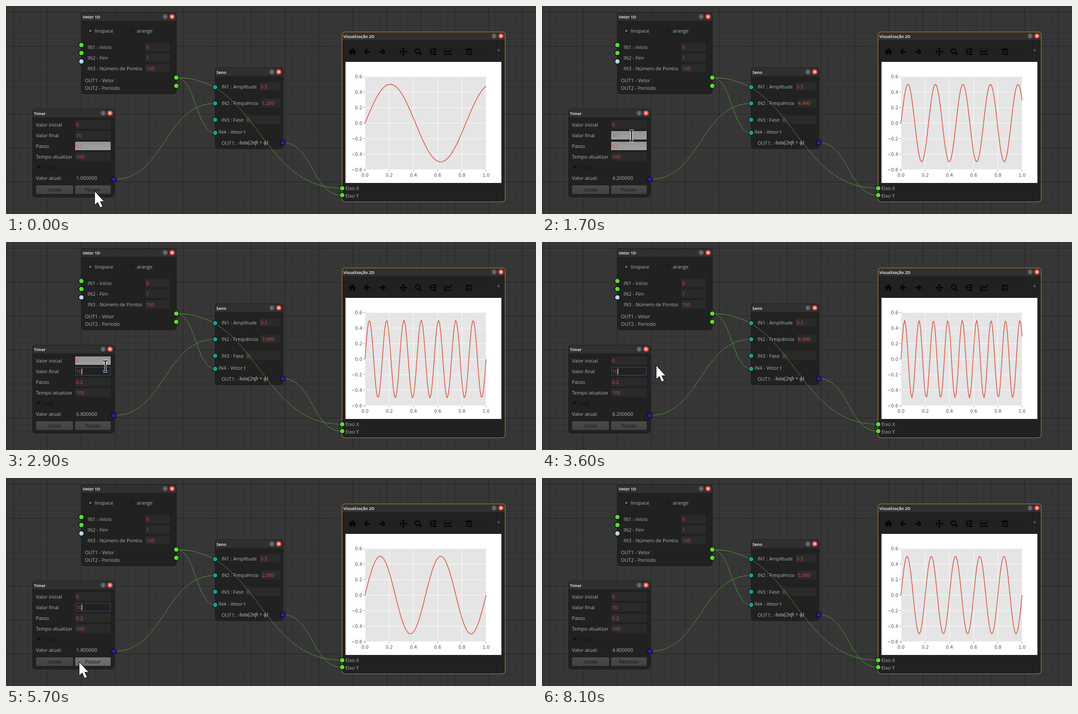
These frames come from a looping animation (1195x469 px, 8.5 s). An HTML page with a canvas:

```html
<!DOCTYPE html>
<html lang="pt">
<head>
<meta charset="utf-8">
<title>Editor de nós</title>
<style>
html, body { margin: 0; width: 100%; height: 100%; overflow: hidden; background: #363636; }
canvas { display: block; }
</style>
</head>
<body>
<canvas id="stage" width="1195" height="469"></canvas>
<script>
const c = document.getElementById('stage').getContext('2d');
const SANS = '"Open Sans", "Noto Sans", sans-serif';
const PLOT = '"DejaVu Sans", sans-serif';
const MATH = '"Liberation Serif", serif';
const GREY = '#b2b2b2', RED = '#f0453f', INK = '#040404';
const GREEN = '#5bdc33', TEAL = '#17a094', PURPLE = '#3a14a4', BLUE = '#b5d9ec';
const LOOP = 8500, TICK = 100;
const FOCUS_ON = 19, FOCUS_OFF = 77, PAUSE = 71, GONE = 81;

// Key points: tick, value(s)
const steps = [[0, 0], [17, 16], [29, 29], [57, 55], [66, 64], [PAUSE, 70]];
const path = [
  [0, 200, 418], [9, 190, 322], [13, 125, 304], [17, 202, 293], [29, 224, 280], [43, 291, 277],
  [57, 165, 415], [60, 140, 415], [66, 174, 416], [76, 174, 416], [80, 89, 5]
];

const linear = t => t;
const smooth = t => t * t * (3 - 2 * t);

function along(keys, k, ease) {
  const i = keys.findIndex(key => key[0] > k);
  if (i < 0) return keys.at(-1).slice(1);
  const [a, ...from] = keys[i - 1], [b, ...to] = keys[i];
  const f = ease((k - a) / (b - a));
  return from.map((v, j) => v + (to[j] - v) * f);
}

function text(s, x, y, color = GREY, font = '11px ' + SANS, align = 'left') {
  c.font = font;
  c.textAlign = align;
  c.fillStyle = color;
  c.fillText(s, x, y);
}

function rect(x, y, w, h, color) {
  c.fillStyle = color;
  c.fillRect(x, y, w, h);
}

function dot(x, y, r, fill, stroke, width = 1.4) {
  c.beginPath();
  c.arc(x, y, r, 0, 7);
  if (fill) { c.fillStyle = fill; c.fill(); }
  if (stroke) { c.strokeStyle = stroke; c.lineWidth = width; c.stroke(); }
}

function line(points, color, width, close) {
  c.beginPath();
  points.forEach(([x, y]) => c.lineTo(x, y));
  if (close) c.closePath();
  c.strokeStyle = color;
  c.lineWidth = width;
  c.stroke();
}

function shape(points, color) {
  c.beginPath();
  points.forEach(([x, y]) => c.lineTo(x, y));
  c.fillStyle = color;
  c.fill();
}

function box(x, y, w, h, r, fill, stroke, width = 1) {
  c.beginPath();
  c.roundRect(x, y, w, h, r);
  if (fill) { c.fillStyle = fill; c.fill(); }
  if (stroke) { c.strokeStyle = stroke; c.lineWidth = width; c.stroke(); }
}

function shade(y, h, top, bottom) {
  const g = c.createLinearGradient(0, y, 0, y + h);
  g.addColorStop(0, top);
  g.addColorStop(1, bottom);
  return g;
}

function grid() {
  rect(0, 0, 1195, 469, '#373737');
  for (let i = -1; i < 80; i++) {
    const bold = i % 5 === 0, d = i * 15.3;
    const color = bold ? '#292929' : '#303030', width = bold ? 1.5 : 0.8;
    line([[17 + d, 0], [17 + d, 469]], color, width);
    line([[0, 14.3 + d], [1195, 14.3 + d]], color, width);
  }
}

function node(title, x, y, w, h, border = '#191919') {
  box(x, y, w, h, 7, '#212121');
  box(x, y, w, 18.5, [7, 7, 0, 0], '#303030');
  box(x, y, w, h, 7, null, border, 1.1);
  text(title, x + 3, y + 13, '#fff', '600 9.4px ' + SANS);
  const cy = y + 9, bx = x + w - 9.5;
  dot(bx - 15.5, cy, 5.8, '#5a5a61');
  text('i', bx - 15.5, cy + 3.2, '#c4c4c4', '9px ' + SANS, 'center');
  dot(bx, cy, 5.8, '#fa524d');
  for (const d of [-2.2, 2.2]) line([[bx - d, cy - 2.2], [bx + d, cy + 2.2]], '#fff', 1.3);
}

function field(s, x, y, w, state) {
  rect(x, y - 10, w, 19, state === 'hover' ? shade(y - 10, 19, '#959595', '#a0a0a0') : '#2a2a2a');
  if (state === 'focus') {
    box(x + 0.5, y - 9.5, w - 1, 18, 0, '#202124', '#2c5584');
    rect(x + 14.5, y - 7, 1.2, 14, '#eee');
  }
  text(s, x + 2, y + 4, RED);
}

function button(s, x, w, hover) {
  const fill = hover ? shade(405, 18, '#757575', '#666') : shade(405, 18, '#4b4b4b', '#414141');
  box(x + 0.5, 405, w - 1, 18, 1.5, fill, hover ? '#777' : '#555', 0.8);
  text(s, x + w / 2, 418, '#171717', '11px ' + SANS, 'center');
}

function edge(x, y, u, v) {
  const mid = (x + u) / 2;
  c.beginPath();
  c.moveTo(x, y);
  c.bezierCurveTo(mid, y, mid, v, u, v);
  c.strokeStyle = '#55b035';
  c.lineWidth = 0.9;
  c.stroke();
}

function sockets(x, color, ...ys) {
  ys.forEach(y => dot(x, y, 5.8, color, '#080808'));
}

function toolbar() {
  const y = 103;
  shape([[772, 104], [781, 95.5], [790, 104]], INK);
  rect(775, y, 4.5, 6.5, INK);
  rect(782.5, y, 4.5, 6.5, INK);
  for (const [x, d] of [[815, -1], [848, 1]]) {
    line([[x - 7 * d, y], [x + 5 * d, y]], INK, 3);
    line([[x, y - 6], [x + 6 * d, y], [x, y + 6]], INK, 3);
  }
  for (let i = 0; i < 4; i++) {
    c.save();
    c.translate(896, y);
    c.rotate(i * Math.PI / 2);
    rect(0, -1, 7, 2, INK);
    shape([[9, 0], [5, -3.5], [5, 3.5]], INK);
    c.restore();
  }
  dot(928, 101.5, 5, null, INK, 2.4);
  line([[931.5, 105], [936.5, 110]], INK, 3.2);
  for (const i of [-1, 0, 1]) {
    rect(955, y + i * 5.5 - 1, 16, 2, INK);
    rect(i ? 965 : 957, y + i * 5.5 - 2.5, 3.5, 5, INK);
  }
  line([[989, 96], [989, 109], [1006, 109]], INK, 1.8);
  line([[991, 106], [995, 101], [999, 104], [1005, 97]], INK, 2.2);
  box(1038, 97, 12, 12, 1, null, INK, 2);
  rect(1040, 97, 6, 4, INK);
  rect(1040, 104, 8, 1.5, INK);
  text('»', 1111, 103, '#8d8d8d', '12px ' + SANS, 'center');
}

function plot(freq) {
  const x0 = 809.5, y0 = 159, w = 273, h = 210;
  rect(765.5, 126, 351.5, 273, '#fff');
  rect(x0, y0, w, h, '#e5e5e5');
  for (let i = 0; i < 6; i++) {
    const x = x0 + i * w / 5;
    line([[x, y0], [x, y0 + h]], '#fff', 0.9);
    line([[x, y0 + h], [x, y0 + h + 3.5]], '#555', 0.8);
    text((i / 5).toFixed(1), x, 385, '#555', '10px ' + PLOT, 'center');
  }
  for (let i = -3; i <= 3; i++) {
    const y = y0 + h / 2 - i * h / 6;
    line([[x0, y], [x0 + w, y]], '#fff', 0.9);
    line([[x0 - 3.5, y], [x0, y]], '#555', 0.8);
    text((i / 5).toFixed(1).replace('-', '−'), 803, y + 4, '#555', '10px ' + PLOT, 'right');
  }
  const wave = Array.from({ length: 100 }, (_, i) => {
    const t = i / 99;
    return [x0 + w * t, y0 + h / 2 - 87.5 * Math.sin(2 * Math.PI * freq * t)];
  });
  c.lineJoin = 'round';
  line(wave, '#dd503b', 1.6);
  c.lineJoin = 'miter';
}

function pointer(x, y, beam) {
  c.save();
  c.translate(x, y);
  c.lineJoin = 'round';
  if (beam) {
    for (const [color, width] of [['#fff', 4.4], ['#000', 2.2]]) {
      for (const d of [-1, 1]) {
        line([[-5, 12 * d], [-1.5, 12 * d], [0, 10.5 * d], [1.5, 12 * d], [5, 12 * d]], color, width);
      }
      line([[0, -11], [0, 11]], color, width);
    }
  } else {
    const arrow = [[0.5, 0.5], [0.5, 30], [7, 24], [12.5, 36], [17.5, 34], [12, 22.5], [20.5, 22.5]];
    line(arrow, '#000', 2.2, true);
    shape(arrow, '#fff');
  }
  c.restore();
}

function draw(k) {
  const step = 6 + Math.round(along(steps, k, linear)[0]);
  const freq = step % 51 / 5, shown = (step - 1) % 51 / 5;
  const [px, py] = along(path, k, smooth);
  const overFields = px > 156 && px < 236;
  const row = overFields ? Math.round((py - 272) / 24) : -1;
  const onButtons = k > 2 && py > 405 && py < 424;

  grid();

  node('Vetor 1D', 170, 15, 214, 183);
  dot(190, 56, 4.5, '#1c1c1c');
  dot(190, 56, 2.3, '#858585');
  dot(285, 56, 4.5, '#1d1d1d', '#191919', 1);
  text('linspace', 200, 60);
  text('arange', 295, 60);
  [['IN1 - Início', '0'], ['IN2 - Fim', '1'], ['IN3 - Número de Pontos', '100']].forEach(([s, v], i) => {
    text(s, 184, 97 + i * 24);
    field(v, 314, 93 + i * 24, 55);
  });
  text('OUT1 - Vetor', 178, 172);
  text('OUT2 - Período', 178, 189);

  node('Timer', 60, 232.5, 184, 198.5);
  [['Valor inicial', '0'], ['Valor final', '10'], ['Passo', '0.2'], ['Tempo atualizar', '100']].forEach(([s, v], i) => {
    const focus = i === 1 && k >= FOCUS_ON && k < FOCUS_OFF;
    const hover = i === row || (i === 2 && k < FOCUS_ON);
    text(s, 67.5, 272 + i * 24);
    field(v, 156, 268 + i * 24, 80, focus ? 'focus' : hover ? 'hover' : '');
  });
  line([[70, 362], [72.5, 365.5], [77, 358]], INK, 1.8);
  text('Loop', 82, 367, '#0d0d0d');
  text('Valor atual:', 67.5, 391.5);
  text(shown.toFixed(6), 158.5, 391.5);
  button('Iniciar', 68, 83, onButtons && px > 68 && px < 151);
  button(k < PAUSE ? 'Pausar' : 'Retomar', 156, 80, onButtons && overFields);

  node('Seno', 471.5, 139.5, 153, 182.5);
  text('IN1 : Amplitude', 486, 186);
  field('0.5', 572, 182, 46);
  text('IN2 : Frequência', 486, 223);
  field(freq.toFixed(3), 575, 219, 43);
  text('IN3 : Fase', 486, 260.5);
  field('0', 541, 256.5, 77);
  text('IN4 - Vetor t', 479, 288);
  text('OUT1:', 486, 313);
  text('Asin(2πft\u2009+\u2009ϕ)', 524, 312, '#d0d0d0', 'italic 12px ' + MATH);

  node('Visualização 2D', 757.5, 58.5, 368, 383, '#c4872b');
  toolbar();
  plot(freq);
  text('Eixo X', 765.5, 414.5);
  text('Eixo Y', 765.5, 431.5);

  edge(384, 161.5, 472, 286);
  edge(384, 161.5, 758, 411);
  edge(243.5, 391, 472, 219.5);
  edge(624.5, 308, 758, 427);
  sockets(170, GREEN, 88, 106);
  sockets(170, BLUE, 125);
  sockets(384, GREEN, 161.5, 180);
  sockets(471.5, TEAL, 183, 219.5, 256.5, 286);
  sockets(243.5, PURPLE, 391);
  sockets(624.5, PURPLE, 308);
  sockets(758, GREEN, 411, 426.5);

  if (k < GONE) pointer(px, py, row >= 0 && row < 4);
}

let last = -1;
function frame(now) {
  const k = Math.floor(now % LOOP / TICK);
  if (k !== last) draw(last = k);
  requestAnimationFrame(frame);
}
draw(0);
requestAnimationFrame(frame);
</script>
</body>
</html>
```
